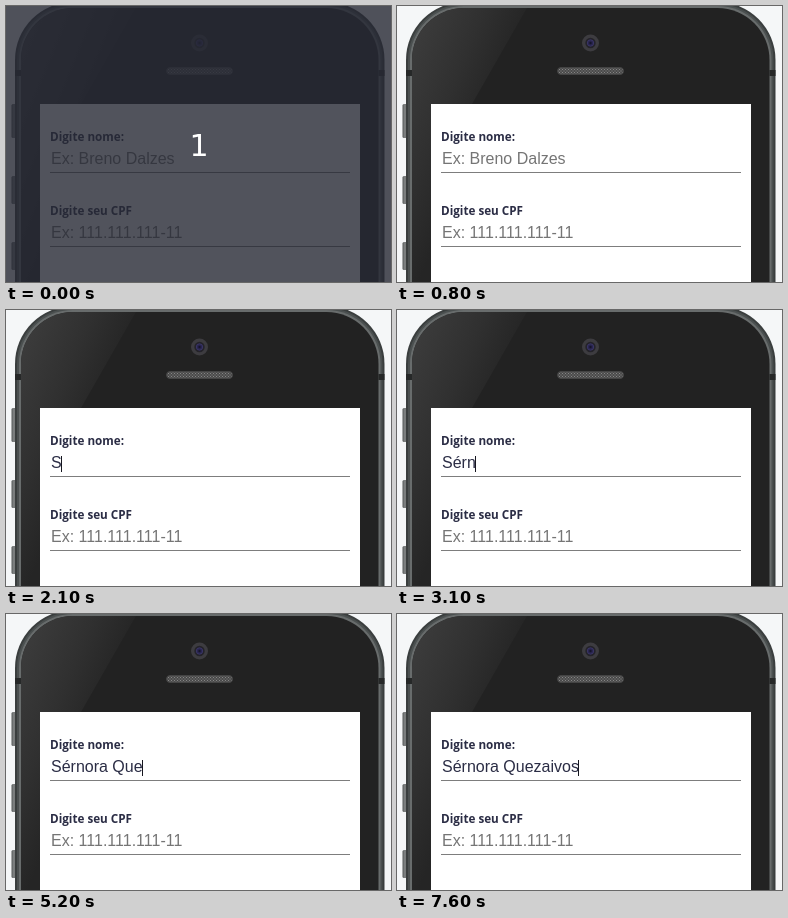
Recreate the animation shown at these times as an HTML page. Size 385x276 px, loop 8000 ms.

```html
<!DOCTYPE html>
<html lang="pt-BR">
<head>
<meta charset="utf-8">
<title>Formulário no celular</title>
<style>
  html, body { margin: 0; width: 100%; height: 100%; overflow: hidden; background: #f5f7f8; }
  svg { display: block; width: 100%; height: 100%; }
  text { white-space: pre; }
  .label { font: 700 11.7px "Open Sans", "Noto Sans", sans-serif; fill: #2b2d45; }
  .input { font: 16px "Liberation Sans", Arial, sans-serif; fill: #757575; }
  .input.typed { fill: #2b2d45; }
  .count { font: 30px "DejaVu Sans", sans-serif; fill: #fff; text-anchor: middle; }
</style>
</head>
<body>
<svg viewBox="0 0 385 276">
  <defs>
    <linearGradient id="gloss" gradientUnits="userSpaceOnUse" x1="20" y1="30" x2="108" y2="66">
      <stop offset="0" stop-color="#3b3b3b"/>
      <stop offset=".55" stop-color="#303030"/>
      <stop offset="1" stop-color="#252525"/>
    </linearGradient>
    <linearGradient id="button">
      <stop offset="0" stop-color="#555959"/>
      <stop offset=".5" stop-color="#858888"/>
      <stop offset="1" stop-color="#4b4f4f"/>
    </linearGradient>
    <pattern id="mesh" width="3" height="3" patternUnits="userSpaceOnUse">
      <rect width="3" height="3" fill="#4b4b4b"/>
      <path d="M0 0h1v1h-1zM1.5 1.5h1v1h-1z" fill="#858585"/>
    </pattern>
    <clipPath id="face"><rect x="15" y="2" width="357.5" height="400" rx="52"/></clipPath>
  </defs>

  <rect width="385" height="276" fill="#f5f7f8"/>
  <g fill="url(#button)">
    <rect x="5.5" y="98" width="5" height="34" rx="1.5"/>
    <rect x="5.5" y="170" width="5" height="28" rx="1.5"/>
    <rect x="5.5" y="236" width="5" height="28" rx="1.5"/>
  </g>
  <rect x="9" y="-4" width="369.5" height="410" rx="58" fill="#3a3e3e"/>
  <rect x="11" y="-2" width="365.5" height="406" rx="56" fill="#4b5050"/>
  <rect x="13" y="0" width="361.5" height="402" rx="54" fill="#686c6c"/>
  <path d="M9 64h6v6h-6zM372.5 64h6v6h-6z" fill="#262828"/>
  <g clip-path="url(#face)">
    <rect width="385" height="276" fill="#222"/>
    <path d="M0 0H131L75 98L34 176V276H0Z" fill="url(#gloss)"/>
  </g>

  <circle cx="193.5" cy="37" r="8.5" fill="#3d3c40"/>
  <circle cx="193.5" cy="37" r="5.2" fill="#242329"/>
  <circle cx="193.5" cy="37" r="3.2" fill="#29254f" stroke="#393565"/>
  <circle cx="193.5" cy="37" r="1.2" fill="#15142a"/>
  <rect x="160.5" y="61.5" width="66" height="7" rx="3.5" fill="url(#mesh)" stroke="#444"/>

  <rect x="34" y="98" width="320" height="178" fill="#fff"/>
  <text class="label" x="44" y="135">Digite nome:</text>
  <text class="label" x="44" y="209">Digite seu CPF</text>
  <path d="M44 166.5H344M44 240.5H344" stroke="#7d7d7d"/>
  <text class="input" id="name" x="45" y="158"></text>
  <text class="input" x="45" y="232">Ex: 111.111.111-11</text>
  <rect id="caret" y="146" width="1" height="16" fill="#16161f"/>

  <g id="countdown">
    <rect width="385" height="276" fill="#262934" opacity=".8"/>
    <text class="count" x="193" y="150">1</text>
  </g>
</svg>
<script>
  const LOOP = 8000, COUNT_END = 400, FOCUS = 1200, LEFT = 45;
  const HINT = "Ex: Breno Dalzes";
  const NAME = "Sérnora Quezaivos";
  // One keystroke time per letter
  const KEYS = [2100, 2700, 2900, 3100, 3300, 3600, 3700, 4000, 4600,
                4900, 5200, 5700, 6200, 6500, 6800, 6800, 7600];

  const $ = id => document.getElementById(id);
  const field = $("name"), caret = $("caret"), countdown = $("countdown");
  const show = (el, on) => el.setAttribute("visibility", on ? "visible" : "hidden");
  let shown;

  function update(t) {
    const typed = KEYS.filter(k => k <= t).length;
    show(countdown, t < COUNT_END);
    show(caret, t >= FOCUS);
    if (typed === shown) return;
    shown = typed;
    field.textContent = typed ? NAME.slice(0, typed) : HINT;
    field.classList.toggle("typed", typed > 0);
    const width = typed ? field.getComputedTextLength() : 0;
    caret.setAttribute("x", Math.floor(LEFT + width));
  }

  const start = performance.now();
  function tick() {
    update((performance.now() - start) % LOOP);
    requestAnimationFrame(tick);
  }
  tick();
</script>
</body>
</html>
```
